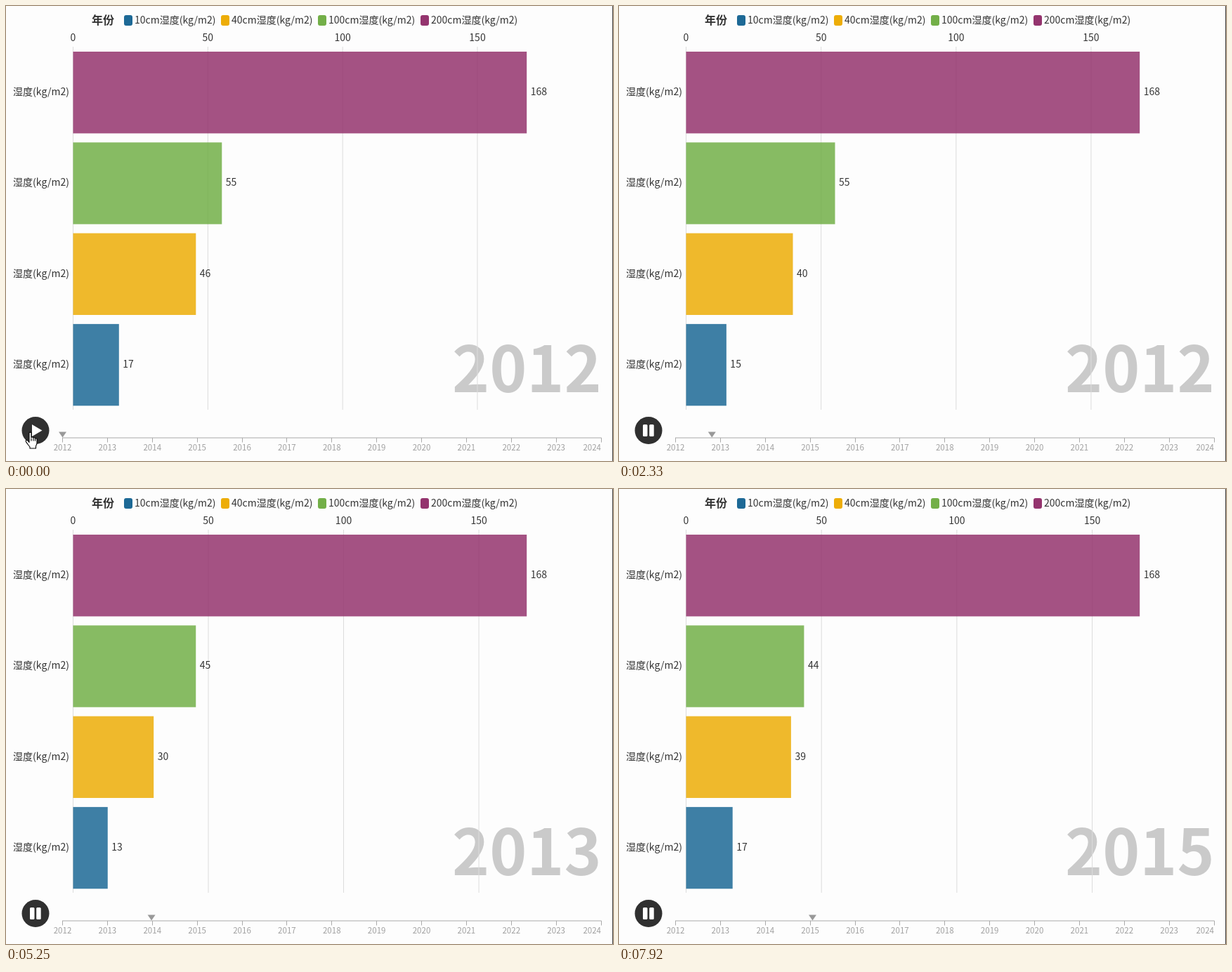
Write an HTML page with a canvas that moves like this. It is 864 px wide and 648 px high and loops after 8000 ms.

```html
<!DOCTYPE html>
<html lang="zh-CN">
<head>
<meta charset="utf-8">
<title>湿度</title>
<style>
  html, body { margin: 0; width: 100%; height: 100%; overflow: hidden; background: #fdfdfd; }
  canvas { display: block; width: 864px; height: 648px; }
</style>
</head>
<body>
<canvas id="stage"></canvas>
<script>
const W = 864, H = 648, LOOP = 8000;
const FONT = '"Noto Sans CJK SC", "Noto Sans CJK", "Noto Sans", sans-serif';
const INK = '#333';
const UNIT = '湿度(kg/m2)';

// One value per year, starting with 2012
const SERIES = [
  { name: '200cm', color: '#94346E', values: [168.3, 167.95, 167.7, 167.55, 167.5] },
  { name: '100cm', color: '#73AF48', values: [55.2, 55.15, 45.2, 43.65, 42] },
  { name: '40cm', color: '#EDAD08', values: [45.56, 38.15, 29.63, 39.25, 30] },
  { name: '10cm', color: '#1D6996', values: [17.02, 14.44, 12.76, 17.27, 15.5] }
];
const LEGEND_X = [590, 444, 306, 168];

const LEFT = 95.5, PLOT_W = 645.7;
const BAR_TOP = 65, BAR_H = 116.4, BAR_STEP = 129.3;
const AXIS_X = 80.5, AXIS_W = 766.5, AXIS_Y = 615;
const FIRST_YEAR = 2012, LAST_YEAR = 2024;

// [ms, years since the first]
const PROGRESS = [[0, 0], [390, 0], [1330, 0.375], [2330, 0.81], [8000, 3.084]];

const canvas = document.getElementById('stage');
const ctx = canvas.getContext('2d');
const dpr = window.devicePixelRatio || 1;
canvas.width = W * dpr;
canvas.height = H * dpr;

const lerp = (a, b, k) => a + (b - a) * k;
const clamp = v => Math.max(0, Math.min(1, v));

function yearAt(t) {
  let i = 1;
  while (i < PROGRESS.length - 1 && t > PROGRESS[i][0]) i++;
  const [t0, p0] = PROGRESS[i - 1], [t1, p1] = PROGRESS[i];
  return lerp(p0, p1, clamp((t - t0) / (t1 - t0)));
}

function valueAt(values, p) {
  const i = Math.floor(p);
  return lerp(values[i], values[i + 1], p - i);
}

function text(str, x, y, size, { align = 'left', color = INK, weight = 400 } = {}) {
  ctx.font = `${weight} ${size}px ${FONT}`;
  ctx.textAlign = align;
  ctx.fillStyle = color;
  ctx.fillText(str, x, y);
}

function rect(x, y, w, h, color) {
  ctx.fillStyle = color;
  ctx.fillRect(x, y, w, h);
}

function roundRect(x, y, w, h, r, color) {
  ctx.fillStyle = color;
  ctx.beginPath();
  ctx.roundRect(x, y, w, h, r);
  ctx.fill();
}

function triangle(x1, y1, x2, y2, x3, y3, color) {
  ctx.fillStyle = color;
  ctx.beginPath();
  ctx.moveTo(x1, y1);
  ctx.lineTo(x2, y2);
  ctx.lineTo(x3, y3);
  ctx.fill();
}

function drawLegend() {
  text('年份', 122, 25.5, 16, { weight: 700 });
  SERIES.forEach((s, i) => {
    const x = LEGEND_X[i];
    roundRect(x, 13, 12, 15, 3, s.color);
    text(s.name + UNIT, x + 15, 25, 14);
  });
}

function drawGrid(max) {
  for (let v = 0; v <= 150; v += 50) {
    const x = LEFT + PLOT_W * v / max;
    rect(x - 0.5, 58, 1, 517, '#dcdcdc');
    text(v, x, 49.5, 14, { align: 'center' });
  }
}

function drawBars(p, max) {
  SERIES.forEach((s, i) => {
    const v = valueAt(s.values, p);
    const w = PLOT_W * v / max, y = BAR_TOP + i * BAR_STEP;
    ctx.globalAlpha = 0.85;
    rect(LEFT, y, w, BAR_H, s.color);
    ctx.globalAlpha = 1;
    text(Math.round(v), LEFT + w + 5.5, y + 62, 14);
    ctx.save();
    ctx.beginPath();
    ctx.rect(10.5, y, 90, BAR_H);
    ctx.clip();
    text(UNIT, 90, y + 62, 14, { align: 'right' });
    ctx.restore();
  });
}

function drawTimeline(p) {
  const years = LAST_YEAR - FIRST_YEAR, step = AXIS_W / years;
  rect(AXIS_X - 0.5, AXIS_Y - 0.5, AXIS_W + 1, 1, '#aaa');
  for (let i = 0; i <= years; i++) {
    const x = AXIS_X + i * step, last = i === years;
    rect(Math.round(x - 0.5), AXIS_Y, 1, 6.5, '#aaa');
    text(FIRST_YEAR + i, last ? 847 : x, 633, 11.5, { align: last ? 'right' : 'center', color: '#a0a0a0' });
  }
  const x = AXIS_X + p * step;
  triangle(x - 5.5, 606.5, x + 5.5, 606.5, x, 614.5, '#999');
}

function drawButton(playing) {
  ctx.fillStyle = '#303030';
  ctx.beginPath();
  ctx.arc(42, 604.5, 19.5, 0, Math.PI * 2);
  ctx.fill();
  if (playing) {
    roundRect(34, 596, 6.5, 17, 1.5, '#fff');
    roundRect(43.2, 596, 6.5, 17, 1.5, '#fff');
  } else {
    triangle(37, 596, 51.5, 604.5, 37, 613, '#fff');
  }
}

const HAND = new Path2D('M6 1.5C6 .3 9 .3 9 1.5V8C9.5 7 12 7.3 12 8.7C12.5 7.8 14.6 8.2 14.6 9.6' +
  'C15.2 8.8 17 9.3 17 11V16C17 18 15.5 19 15.5 21V23.5H7V21.5C5 19 2.5 16 1.3 13.8C.5 12 2.6 11 4 12.6L6 15Z');

function drawCursor(t) {
  if (t > 800) return;
  ctx.save();
  ctx.translate(27, 606.5 + 11 * clamp((t - 420) / 350));
  ctx.fillStyle = '#fff';
  ctx.strokeStyle = '#000';
  ctx.lineWidth = 1.1;
  ctx.lineJoin = 'round';
  ctx.fill(HAND);
  ctx.stroke(HAND);
  ctx.beginPath();
  for (const x of [9, 12, 14.5]) {
    ctx.moveTo(x, 9);
    ctx.lineTo(x, 13);
  }
  ctx.stroke();
  ctx.restore();
}

function draw(t) {
  const p = yearAt(t), max = valueAt(SERIES[0].values, p);
  ctx.setTransform(dpr, 0, 0, dpr, 0, 0);
  rect(0, 0, W, H, '#fdfdfd');
  text(FIRST_YEAR + Math.floor(p), 847.5, 550, 90, { align: 'right', color: '#cacaca', weight: 700 });
  drawGrid(max);
  drawBars(p, max);
  drawLegend();
  drawTimeline(p);
  drawButton(t >= 390);
  drawCursor(t);
  rect(863, 0, 1, H, '#444');
}

const start = performance.now();
function frame() {
  draw((performance.now() - start) % LOOP);
  requestAnimationFrame(frame);
}
frame();
</script>
</body>
</html>
```
